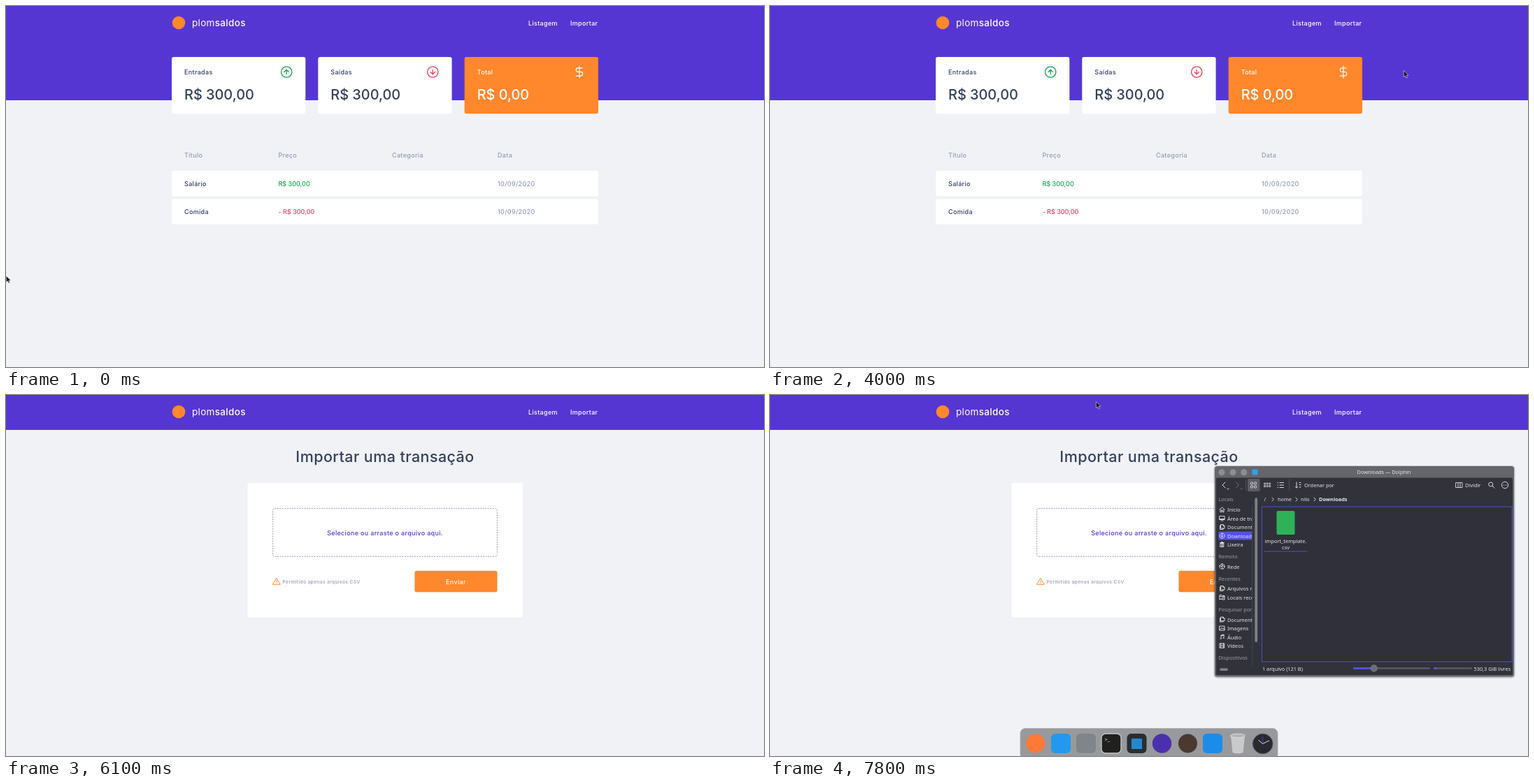
An HTML page for the animation above (8 s loop, 1084 px wide and 517 px high).

```html
<!DOCTYPE html>
<html lang="pt-BR">
<head>
<meta charset="utf-8">
<title>Finanças</title>
<style>
  html, body { margin: 0; width: 100%; height: 100%; overflow: hidden; background: #f0f2f5; }
  svg { display: block; width: 100%; height: 100%; }
  text { white-space: pre; }
  .app { font: 500 9.03px Inter, sans-serif; letter-spacing: .035em; fill: #363f5f; }
  .app .plain { letter-spacing: 0; }
  .app .value { font-size: 19.9px; letter-spacing: 0; }
  .app .title { font-size: 21.5px; letter-spacing: .02em; }
  .app .brand { font-size: 13.5px; }
  .app .note { font-size: 6.77px; }
  .desk { font: 7.35px "Noto Sans", sans-serif; fill: #e6e6e8; }
  .mid { text-anchor: middle; }
  .line { fill: none; stroke-linecap: round; stroke-linejoin: round; }
</style>
</head>
<body>
<svg id="stage" viewBox="0 0 1084 517" preserveAspectRatio="none"></svg>
<script>
const PURPLE = '#5636d3', ORANGE = '#ff872c', WHITE = '#fff', INK = '#363f5f',
      MUTED = '#969cb3', GREEN = '#12a454', RED = '#e83f5b', PALE = '#dcdce0', BLUE = '#5450e6',
      FRAME = '#65666b', PANEL = '#31323a';

const text = (x, y, s, fill = '', cls = '') =>
  `<text x="${x}" y="${y}" class="${cls}"${fill && ` fill="${fill}"`}>${s}</text>`;
const rect = (x, y, w, h, fill, r = 0, more = '') =>
  `<rect x="${x}" y="${y}" width="${w}" height="${h}" rx="${r}" fill="${fill}" ${more}/>`;
const circle = (x, y, r, fill, more = '') =>
  `<circle cx="${x}" cy="${y}" r="${r}" fill="${fill}" ${more}/>`;
const line = (d, color, width = 1, more = '') =>
  `<path class="line" d="${d}" stroke="${color}" stroke-width="${width}" ${more}/>`;

// ---- Web pages ----
const arrowIcon = (x, color, dir) =>
  circle(x, 94.5, 7.7, 'none', `stroke="${color}" stroke-width="1.3"`) +
  line(`M${x} ${94.5 + 3.2 * dir}v${-6.4 * dir}m-3.2 ${3.2 * dir}l3.2 ${-3.2 * dir}l3.2 ${3.2 * dir}`, color, 1.3);

const summaryCard = (x, label, value, bg, fg) =>
  rect(x, 73, 191.3, 81.3, bg, 2.8) + text(x + 18, 98, label, fg) + text(x + 18, 134, value, fg, 'value');

const columns = [255, 389.5, 552, 703];
const tableRow = (y, title, price, color) =>
  rect(237, y, 610, 36.2, WHITE, 2.8) +
  text(columns[0], y + 21.5, title) +
  text(columns[1], y + 21.5, price, color, 'plain') +
  text(columns[3], y + 21.5, '10/09/2020', MUTED);

const header =
  circle(247, 24, 9.3, ORANGE) +
  text(266, 28.5, '<tspan font-weight="400">plom</tspan>saldos', WHITE, 'brand') +
  text(747, 28, 'Listagem', WHITE) +
  `<g id="importLink">${text(807, 28, 'Importar', WHITE)}</g>`;

const listPage =
  rect(0, 0, 1084, 135, PURPLE) +
  summaryCard(237, 'Entradas', 'R$ 300,00', WHITE, INK) + arrowIcon(401.2, GREEN, 1) +
  summaryCard(446.3, 'Saídas', 'R$ 300,00', WHITE, INK) + arrowIcon(610.3, RED, -1) +
  summaryCard(655.7, 'Total', 'R$ 0,00', ORANGE, WHITE) +
  line('M12 1v22M17 5H9.5a3.5 3.5 0 0 0 0 7h5a3.5 3.5 0 0 1 0 7H6', WHITE, 1.6,
       'transform="translate(810.5 85) scale(.79)"') +
  ['Título', 'Preço', 'Categoria', 'Data'].map((s, i) => text(columns[i], 216.5, s, MUTED)).join('') +
  tableRow(236, 'Salário', 'R$ 300,00', GREEN) +
  tableRow(276.6, 'Comida', '- R$ 300,00', RED);

const importPage =
  rect(0, 0, 1084, 50, PURPLE) +
  text(542, 95.8, 'Importar uma transação', INK, 'title mid') +
  rect(345.5, 126, 393.5, 192.5, WHITE, 2.8) +
  rect(381.6, 162.6, 320.8, 68.8, 'none', 2.8, `stroke="${MUTED}" stroke-dasharray="2 1.5"`) +
  text(542, 200.5, 'Selecione ou arraste o arquivo aqui.', PURPLE, 'mid') +
  line('M387 262.6l5.2 8.7h-10.4zM387 265.8v2.3M387 269.7v.1', ORANGE, 1) +
  text(395.5, 269.8, 'Permitido apenas arquivos CSV', MUTED, 'note') +
  rect(584.5, 251.7, 118, 30.5, ORANGE, 2.8) +
  text(643.4, 270.5, 'Enviar', WHITE, 'mid');

// ---- File manager ----
const icons = {
  home: 'M.5 4L4 .8 7.5 4M1.5 4v3.7h1.7V5h1.6v2.7h1.7V4',
  screen: 'M.5 1h7v5h-7zM.5 5h7M2.5 7.5h3',
  pages: 'M2.5.5h3l2 2V6h-5zM5.5.5v2h2M2.5 2H1v5.5h4.5V6',
  down: 'M4 .3a3.7 3.7 0 1 0 .1 0M4 2v3.7M2.5 4.3L4 5.8l1.5-1.5',
  trash: 'M1 1.5h6M3 1.5V.5h2v1M1.7 2.5h4.6v5H1.7zM3.3 3v4M4.7 3v4',
  globe: 'M4 .3a3.7 3.7 0 1 0 .1 0M.5 3l3 1 1-3M3.5 4l1.5 3.5M4.5 3l3 1',
  folder: 'M.5 7V1h3l1 1h3v2M.5 3h7M3 7H.5M4.5 5h3v2.5h-3z',
  image: 'M.5 1h7v6h-7zM1 6l2-2.5L4.5 5 6 4l1.5 2',
  note: 'M2.5 6.5V1.5l4-1v5M2.5 2.5l4-1M1.5 6.5h1M5.5 5.5h1',
  film: 'M.8.8h6.4v6.4H.8zM2.2.8v6.4M5.8.8v6.4M2.2 4h3.6'
};
const places = [
  [152, 'Locais'],
  [167, 'Início', 'home'], [179.5, 'Área de trabalho', 'screen'], [192, 'Documentos', 'pages'],
  [204.5, 'Downloads', 'down'], [217, 'Lixeira', 'trash'],
  [233.5, 'Remoto'], [248.5, 'Rede', 'globe'],
  [265.5, 'Recentes'], [280, 'Arquivos recentes', 'pages'], [292.5, 'Locais recentes', 'folder'],
  [309.5, 'Pesquisar por'], [324.5, 'Documentos', 'pages'], [337, 'Imagens', 'image'],
  [349.5, 'Áudio', 'note'], [362, 'Vídeos', 'film'],
  [378.5, 'Dispositivos']
];
const place = ([y, name, icon]) => icon
  ? line(icons[icon], '#e6e6e8', .9, `transform="translate(642.5 ${y - 7})"`) + text(654, y, name)
  : text(641.5, y, name, '#9c9da3');

const grid = (x, y, cols, rows, size, gap) => {
  let out = '';
  for (let i = 0; i < cols * rows; i++)
    out += rect(x + (i % cols) * gap, y + Math.floor(i / cols) * gap, size, size, 'none', .4,
                `stroke="${PALE}" stroke-width=".9"`);
  return out;
};

const toolbar =
  line('M651 125l-4 4 4 4M654 134l1.2 1.2 1.2-1.2', PALE) +
  line('M666.5 125l4 4-4 4M673 134l1.2 1.2 1.2-1.2', '#77787f') +
  line('M680.5 121v16M742.5 121v16', '#5a5b63', .8) +
  rect(683, 120, 17.5, 18, '#5c5d65', 1.5) +
  grid(687.5, 125, 2, 2, 3, 5) +
  grid(706.5, 126, 3, 2, 2, 3.6) +
  line('M729 125.5h5.5M729 129h5.5M729 132.5h5.5M726 125.5h.5M726 129h.5M726 132.5h.5', PALE) +
  line('M753 125v8M751.5 131.5l1.5 1.5 1.5-1.5M757 125.5h2M757 128.5h2M757 132h2', PALE) +
  text(764, 131.7, 'Ordenar por') +
  line('M981 125.5h9v7h-9zM984 125.5v7M987 125.5v7', PALE, .9) +
  text(994, 131.7, 'Dividir') +
  circle(1030.7, 128, 3, 'none', `stroke="${PALE}"`) + line('M1033 130.3l3 3', PALE) +
  circle(1051, 129, 4.7, 'none', `stroke="${PALE}"`) +
  line('M1048.8 129h.1M1051 129h.1M1053.2 129h.1', PALE, 1.2);

const chevron = x => line(`M${x} 147l2.3 2.5-2.3 2.5`, PALE, .9);
const breadcrumbs =
  text(706.5, 152, '/') + chevron(718) + text(726, 152, 'home') + chevron(752) +
  text(759, 152, 'nilo') + chevron(778) +
  text(785, 152, '<tspan font-weight="700">Downloads</tspan>');

const statusRow =
  text(704, 394.5, '1 arquivo (121 B)') +
  rect(834, 390, 110, 2.8, '#55565f', 1.4) + rect(834, 390, 29, 2.8, BLUE, 1.4) +
  circle(863.7, 391.4, 4.8, '#6c6d75', 'stroke="#85868c" stroke-width=".6"') +
  rect(949, 390, 55, 2.8, '#55565f', 1.4) + rect(949, 390, 5, 2.8, BLUE, 1.4) +
  text(1006.5, 394.5, '530,3 GiB livres');

const fileManager =
  rect(636, 102, 428, 301.5, FRAME, 4) +
  rect(638, 118.5, 424, 282.5, PANEL, 1.5) +
  [646, 662, 677.7].map(x => circle(x, 110.8, 4.5, '#8d8e92')).join('') +
  rect(689.5, 106.5, 8, 8, '#2ba3f0', 1.5) +
  text(878, 113, 'Downloads — Dolphin', '', 'mid') +
  toolbar + breadcrumbs +
  rect(641.5, 195.5, 47.7, 12, BLUE) +
  `<g clip-path="url(#sidebar)">${places.map(place).join('')}</g>` +
  line('M689.8 160v227', '#4b4c55', .8) +
  rect(693.3, 147, 3.8, 207, '#7f8086', 1.9) + rect(643, 391.3, 12, 3.6, '#7f8086', 1.8) +
  rect(703.5, 160, 357.5, 222, '#2f3039', 0, `stroke="${BLUE}" stroke-width=".9"`) +
  rect(724.5, 166, 26, 34, '#2fb257', 2) +
  text(737.5, 211.5, 'import_template.', '', 'mid') + text(737.5, 221, 'csv', '', 'mid') +
  line('M706.5 224h61.5', BLUE, .9) +
  statusRow;

// The minimised window: thin bands, stretched and sheared toward the dock, inside a smooth outline.
const warpY = y => { const u = y - 110; return 152 + 1.39 * u + .0024 * u * u; };
const warpEdges = y => {
  const s = Math.min(1, Math.max(0, (y - 141) / 370));
  const left = 611 - 198 * s ** 1.75, right = 1004 - 534 * s * (.26 + .74 * s);
  return { left, right, scale: (right - left) / 428 };
};
const BAND = 1.5, bandTops = Array.from({ length: 138 }, (_, i) => 102 + i * BAND);
const bandClip = (y, i) =>
  `<clipPath id="band${i}">${rect(620, y, 460, BAND + .25, '#000')}</clipPath>`;
const band = (y, i) => {
  const y1 = warpY(y), y2 = warpY(y + BAND), a = warpEdges(y1), b = warpEdges(y2);
  const stretch = (y2 - y1) / BAND, shear = (b.left - a.left) / BAND;
  const scale = (a.scale + b.scale) / 2;
  const m = [scale, 0, shear, stretch, a.left - 636 * scale - shear * y, y1 - stretch * y];
  return `<g transform="matrix(${m})"><use href="#fileManager" clip-path="url(#band${i})"/></g>`;
};
const edge = side => bandTops.map(y => [warpEdges(warpY(y))[side], warpY(y)]);
const outline = `M${edge('left').concat(edge('right').reverse()).join('L')}Z`;
const warped =
  `<path d="${outline}" fill="${PANEL}"/>` +
  `<g clip-path="url(#outline)">${bandTops.map(band).join('')}</g>` +
  line(outline, FRAME, 1.5);

// ---- Dock and pointers ----
const tile = (x, fill, more = '') => rect(x - 14, 485, 28, 28, fill, 6, more);
const dock =
  rect(358, 477.5, 368, 44, '#98999c', 7, 'stroke="#aeafb2"') +
  circle(379.5, 499, 13.5, '#ff7a36') +
  tile(416, '#2299ee') + tile(452, '#7f858a') +
  tile(488, '#20211f', 'stroke="#c8c8c8" stroke-width="1.3"') + text(478.5, 496, '&gt;_', WHITE) +
  tile(524.5, '#292d36') + rect(517, 492, 15, 15, '#2489ca') +
  circle(560.5, 499, 13.7, '#4b30ad') +
  circle(597.5, 499, 13.5, '#4b382f') +
  tile(633, '#1c8cea') +
  '<path d="M659 488h20l-2.5 24q-7.5 3-15 0z" fill="#c9cacb"/>' +
  '<ellipse cx="669" cy="488" rx="10.5" ry="2.8" fill="#b2b3b4" stroke="#dedfe0"/>' +
  circle(704.7, 499.5, 14.3, '#292a31', 'stroke="#55565c"') +
  line('M704.7 499.5l-6-5M704.7 499.5l9-4.5', PALE, 1) + line('M704.7 499.5v-10', BLUE, .7);

const statusBar =
  rect(-2, 508.5, 84, 12, '#e3e4e6', 1.5, 'stroke="#a9abb0" stroke-width=".8"') +
  text(2, 517.6, 'localhost:3000/import', '#34363c');

const arrow = '<path d="M.3.4V9.7L2.4 7.8 3.9 11 5.5 10.3 4.1 7.2H7z" fill="#151515" stroke="#fff" stroke-width=".5"/>';
const hand = '<path d="M-2 .3q1.2-.6 1.5.6l.6 2.5 4 1q1.2.4 1 2L4.5 9.8H-.8L-4.3 6q0-1.5 1.5-.8l1 .6-1-4.6q0-.7.8-.9z" fill="#fff" stroke="#222" stroke-width=".7"/>';

const group = (id, body, cls = '') => `<g id="${id}" class="${cls}">${body}</g>`;
const stage = document.getElementById('stage');
stage.innerHTML =
  `<defs><clipPath id="sidebar">${rect(638, 140, 51.3, 245, '#000')}</clipPath>` +
  `<clipPath id="outline"><path d="${outline}"/></clipPath>` +
  bandTops.map(bandClip).join('') + group('fileManager', fileManager, 'desk') + '</defs>' +
  group('list', listPage, 'app') + group('import', importPage, 'app') + group('header', header, 'app') +
  group('status', statusBar, 'desk') +
  `<g id="warped" opacity=".74">${warped}</g>` +
  group('desktop',
    rect(634.5, 101, 431, 304.5, '#0003', 5) + '<use href="#fileManager"/>' + dock, 'desk') +
  group('pointer', group('arrow', arrow) + group('hand', hand));

// ---- Timeline ----
const LOOP = 8000, STEP = 100;
const pointerPath = [
  [0, 0, 386], [100, 0, 386], [1000, 98, 263], [1800, 232, 187], [1900, 241, 182],
  [2500, 351, 157], [2600, 351, 157], [3000, 538, 174], [3500, 774, 164],
  [3900, 898, 112], [4000, 906, 92], [4400, 836, 34], [4900, 824, 30], [5200, 824, 30],
  [5800, 193, 47], [5900, 193, 47], [6000, 2, 506], [6100, 466, 9], [8000, 466, 9]
];
const pointerAt = t => {
  const i = pointerPath.findIndex(p => p[0] > t);
  const [t0, x0, y0] = pointerPath[i - 1], [t1, x1, y1] = pointerPath[i];
  const k = (t - t0) / (t1 - t0);
  return [x0 + (x1 - x0) * k, y0 + (y1 - y0) * k];
};
const part = Object.fromEntries(
  ['list', 'import', 'importLink', 'status', 'warped', 'desktop', 'pointer', 'arrow', 'hand']
    .map(id => [id, document.getElementById(id)]));
const show = (id, on) => { part[id].style.display = on ? '' : 'none'; };

function render(now) {
  const t = Math.floor((now % LOOP) / STEP) * STEP;
  const hover = t >= 4500 && t < 5300;
  show('list', t < 5200);
  show('import', t >= 5200);
  show('status', hover);
  show('warped', t >= 7100 && t < 7400);
  show('desktop', t >= 7400);
  show('pointer', t < 6100 || t >= 7800);
  show('arrow', !hover);
  show('hand', hover);
  part.importLink.setAttribute('opacity', hover ? .6 : 1);
  part.pointer.setAttribute('transform', `translate(${pointerAt(t)})`);
}
function tick() {
  render(performance.now());
  requestAnimationFrame(tick);
}
tick();
</script>
</body>
</html>
```
